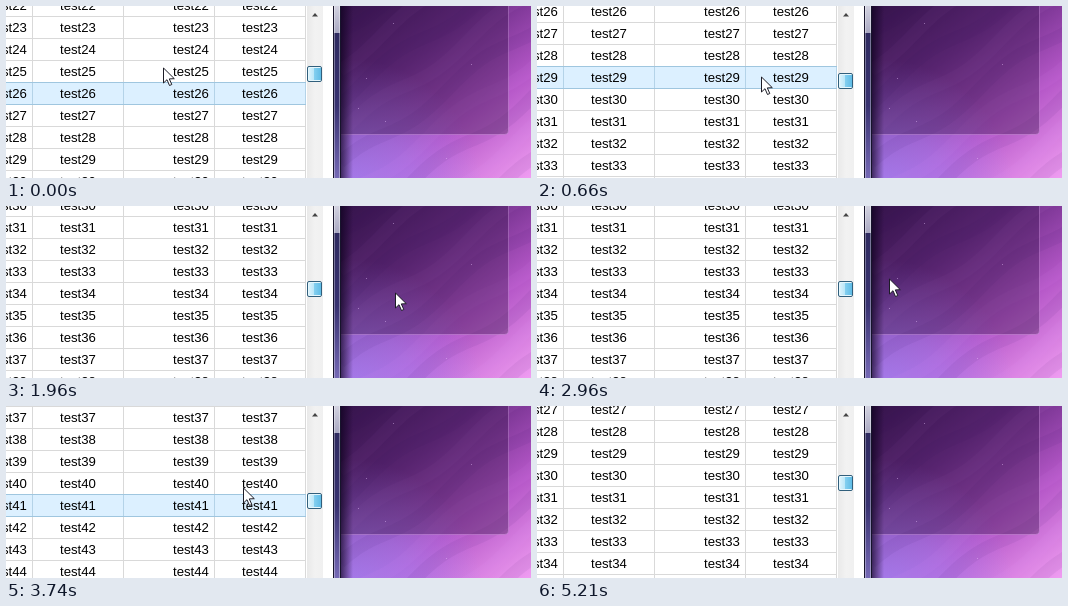
Animation of 525x172 px, one loop 5.49 s. Source, as an HTML page with a canvas:

```html
<!DOCTYPE html>
<html lang="en">
<head>
<meta charset="utf-8">
<title>Scrolling table</title>
<style>
html, body { margin: 0; width: 525px; height: 172px; overflow: hidden; }
canvas { display: block; }
</style>
</head>
<body>
<canvas id="stage" width="525" height="172"></canvas>
<script>
const W = 525, H = 172, LOOP = 5490;
const TICK = 133.6, LAST_TICK = 39, LEAD = 20;
const ROW = 22, FIRST_ROW = 26, FIRST_TOP = 76, TABLE_RIGHT = 299;
const DIVIDERS = [26, 117, 208, TABLE_RIGHT], TEXT_LEFT = [-15, 54, 167, 236];
const ctx = document.getElementById('stage').getContext('2d');

// Key points as [tick, value...]
const scrollKeys = [[-1, 18], [0, 0], [4, 74], [5, 82], [7, 100], [8, 117],
  [10, 176], [22, 176], [27, 336], [28, 318], [32, 106]];
const cursorKeys = [[0, 157, 61], [5, 224, 70], [8, 294, 82], [10, 343, 71],
  [12, 363, 97], [14, 389, 86], [15, 421, 57], [16, 438, 59], [18, 461, 111],
  [19, 469, 62], [20, 474, 75], [22, 352, 72], [25, 240, 66], [28, 237, 81],
  [32, 337, 84], [34, 386, 77], [36, 451, 87], [39, 494, 180]];

function sample(keys, tick, column) {
  const next = keys.findIndex(key => key[0] > tick);
  if (next < 0) return keys[keys.length - 1][column];
  const a = keys[next - 1], b = keys[next];
  return Math.round(a[column] + (b[column] - a[column]) * (tick - a[0]) / (b[0] - a[0]));
}

function rect(x, y, w, h, fill) {
  ctx.fillStyle = fill;
  ctx.fillRect(x, y, w, h);
}

function addStops(g, colors) {
  colors.forEach((c, i) => g.addColorStop(i / (colors.length - 1), c));
  return g;
}

function gradient(x0, y0, x1, y1, ...colors) {
  return addStops(ctx.createLinearGradient(x0, y0, x1, y1), colors);
}

function glow(x, y, r, ...colors) {
  return addStops(ctx.createRadialGradient(x, y, 0, x, y, r), colors);
}

function polygon(points, fill, stroke) {
  ctx.beginPath();
  points.forEach(([x, y]) => ctx.lineTo(x, y));
  ctx.closePath();
  ctx.fillStyle = fill;
  ctx.fill();
  if (!stroke) return;
  ctx.strokeStyle = stroke;
  ctx.stroke();
}

function panel(x, y, w, h, radius, fill, stroke) {
  ctx.beginPath();
  ctx.roundRect(x, y, w, h, radius);
  ctx.fillStyle = fill;
  ctx.fill();
  ctx.strokeStyle = stroke;
  ctx.stroke();
}

function drawWallpaper() {
  rect(334, 0, 191, H, gradient(334, 0, 485, 202, '#36134e', '#6a2c85', '#b557c8', '#f09df2'));
  rect(334, 0, 191, H, glow(342, 188, 135, 'rgba(165,132,246,.85)', 'rgba(165,132,246,.5)', 'rgba(165,132,246,0)'));

  // Soft folds rising to the right
  ctx.lineWidth = 13;
  for (let i = 0; i < 9; i++) {
    ctx.beginPath();
    for (let x = 334; x <= W + 10; x += 5) {
      const u = x - 334;
      ctx.lineTo(x, 25 + i * 34 - u * 0.72 + 6 * Math.sin(u / 20 + i));
    }
    ctx.strokeStyle = i % 2 ? 'rgba(235,150,250,.05)' : 'rgba(45,10,90,.06)';
    ctx.stroke();
  }

  ctx.lineWidth = 1;
  panel(320, -10, 182.5, 138.5, 4, 'rgba(50,20,70,.36)', 'rgba(225,175,240,.34)');

  for (const [x, y] of [[387, 17], [360, 72], [352, 102], [379, 115], [465, 58], [440, 152]])
    rect(x, y, 1, 1, 'rgba(235,200,255,.45)');

  rect(334, 0, 13, H, gradient(334, 0, 347, 0, 'rgba(10,0,25,.7)', 'rgba(10,0,25,0)'));
}

function drawWindowEdge() {
  rect(317, 0, 10, H, '#fff');
  rect(327, 0, 8, H, '#17142c');
  rect(328, 0, 6, 27, gradient(0, 0, 0, 27, '#d2d2e0', '#aaa9c2'));
  rect(328, 27, 6, H - 27, gradient(0, 27, 0, H, '#2f2b60', '#383270', '#7569b5'));
  for (const x of [328, 333]) rect(x, 0, 1, H, 'rgba(255,255,255,.35)');
}

function drawTable(scroll, hovered) {
  const rowTop = n => FIRST_TOP + ROW * (n - FIRST_ROW) - scroll;
  const drawDividers = (y, h, color) => DIVIDERS.forEach(x => rect(x, y, 1, h, color));

  rect(0, 0, 301, H, '#fff');
  const first = FIRST_ROW + Math.floor((scroll - FIRST_TOP) / ROW);
  for (let n = first; rowTop(n) < H; n++) rect(0, rowTop(n), TABLE_RIGHT, 1, '#d9d9d9');
  drawDividers(0, H, '#d9d9d9');

  if (hovered) {
    const y = rowTop(hovered);
    rect(0, y, TABLE_RIGHT, ROW, '#dcf0ff');
    drawDividers(y, ROW, '#b4d3e8');
    for (const edge of [y, y + ROW]) rect(0, edge, TABLE_RIGHT + 1, 1, '#9fc6df');
  }

  ctx.font = '13.2px "Liberation Sans", Arial, sans-serif';
  ctx.fillStyle = '#000';
  for (let n = first; rowTop(n) < H; n++)
    for (const x of TEXT_LEFT) ctx.fillText('test' + n, x, rowTop(n) + 16);
}

function drawScrollbar(scroll) {
  rect(301, 0, 16, H, gradient(301, 0, 317, 0, '#e9e9e9', '#f2f2f2', '#f0f0f0'));
  polygon([[306, 10.5], [309, 7], [312, 10.5]], '#444');
  const y = 60 + Math.round(scroll * 0.085);
  panel(301.5, y + 0.5, 14, 15, 1.5, '#e5f7fd', '#315f7c');
  rect(303, y + 2, 5, 12, gradient(303, 0, 308, 0, '#d9f2fc', '#b9e6f8'));
  rect(308, y + 2, 7, 12, gradient(308, 0, 315, 0, '#85d0f0', '#5fbce6'));
}

function drawCursor(x, y) {
  ctx.save();
  ctx.translate(x + 0.5, y + 0.5);
  polygon([[0, 0.5], [0, 15.5], [3.5, 12.2], [6, 18], [8.3, 17], [5.8, 11.4], [10.8, 11.2]], '#fff', '#1c1c26');
  ctx.restore();
}

function draw(now) {
  const tick = Math.min(LAST_TICK, Math.floor((now % LOOP + LEAD) / TICK));
  const scroll = sample(scrollKeys, tick, 1);
  const x = sample(cursorKeys, tick, 1), y = sample(cursorKeys, tick, 2);

  // Row highlighting trails the scrolling by one tick.
  const lagged = sample(scrollKeys, tick - 1, 1);
  const hovered = x < TABLE_RIGHT && FIRST_ROW + Math.floor((y - FIRST_TOP + lagged) / ROW);

  drawWallpaper();
  drawWindowEdge();
  drawTable(scroll, hovered);
  drawScrollbar(scroll);
  drawCursor(x, y);
}

const start = performance.now();
function loop() {
  draw(performance.now() - start);
  requestAnimationFrame(loop);
}
loop();
</script>
</body>
</html>
```
